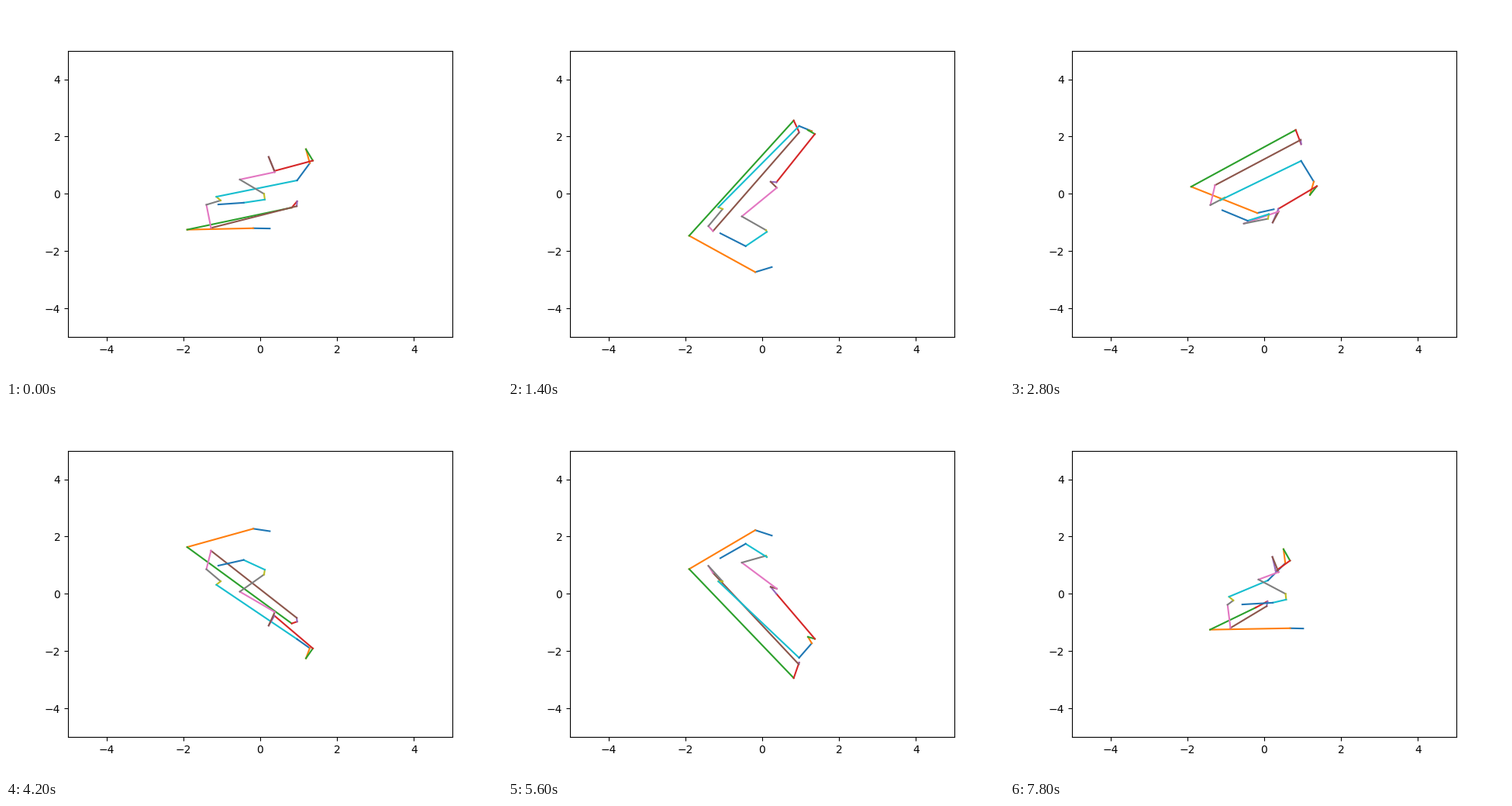
Recreate the animation shown at these times as a matplotlib script. Size 640x480 px, loop 8000 ms.

```python
import numpy as np
import matplotlib.pyplot as plt
from matplotlib.animation import FuncAnimation

STEP = 10            # degrees per frame
TURN = 360 // STEP   # frames in a full turn about the x axis
FRAMES = 40

# Corners of the chain (x, y, depth); the last one centres it on the origin
corners = [
    (0.25, -1.21, -2.28), (-0.18, -1.20, -2.47), (-1.90, -1.25, -1.10),
    (0.82, -0.48, 2.90), (0.96, -0.26, 2.39), (0.95, -0.43, 2.42),
    (-1.28, -1.19, -0.95), (-1.40, -0.38, -1.06), (-1.03, -0.23, -0.48),
    (-1.14, -0.10, -0.46), (0.96, 0.47, 2.35), (1.29, 1.07, 1.94),
    (1.19, 1.56, 1.80), (1.37, 1.16, 1.80), (0.37, 0.80, 0.14),
    (0.22, 1.29, -0.02), (0.38, 0.76, -0.05), (-0.53, 0.50, -1.02),
    (0.10, 0.00, -1.35), (0.12, -0.20, -1.34), (-0.43, -0.31, -1.83),
]
chain = np.vstack([corners, -np.sum(corners, axis=0)])


def project(frame):
    """Turn once about x, then begin turning about y; drop the depth."""
    x, y, z = chain.T
    if frame <= TURN:
        a = np.radians(STEP * frame)
        return x, y * np.cos(a) + z * np.sin(a)
    a = np.radians(STEP * (frame - TURN - 1))
    return x * np.cos(a) - z * np.sin(a), y


fig, ax = plt.subplots(figsize=(6.4, 4.8), dpi=100)
ax.set_xlim(-5, 5)
ax.set_ylim(-5, 5)
links = [ax.plot([], [])[0] for _ in corners]


def draw(frame):
    x, y = project(frame)
    for i, link in enumerate(links):
        link.set_data(x[i:i + 2], y[i:i + 2])
    return links


anim = FuncAnimation(fig, draw, frames=FRAMES, interval=200,
                     init_func=lambda: draw(0), repeat=True, repeat_delay=0)
plt.show()
```
